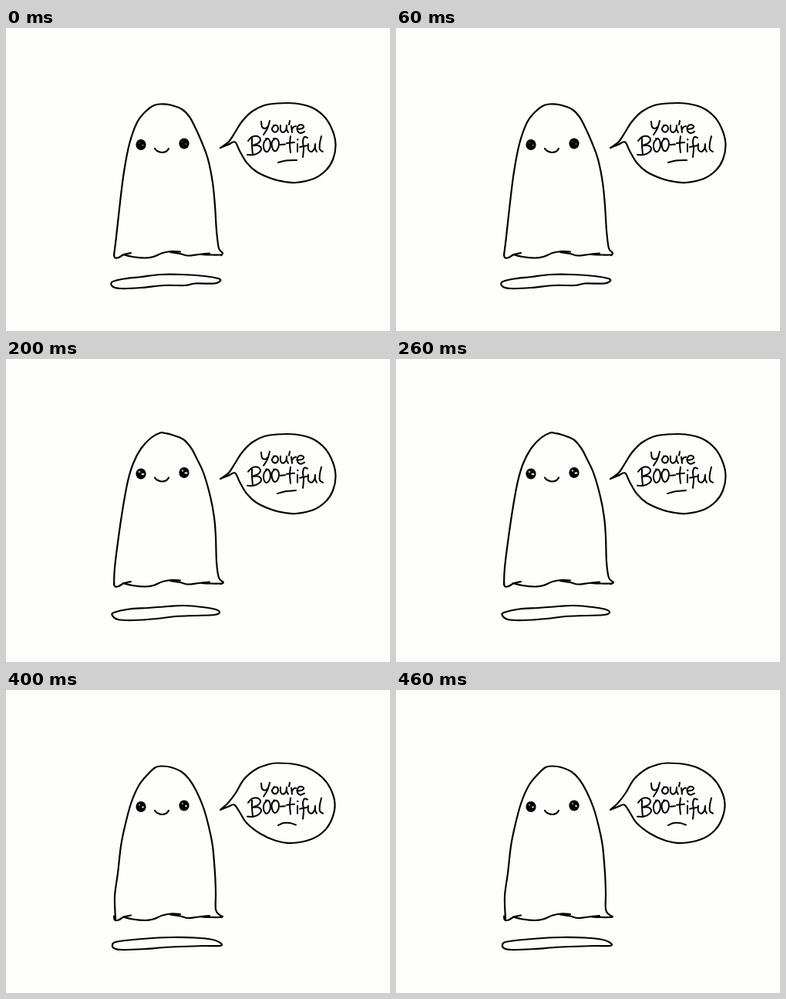
These frames come from a looping animation (498 by 392 pixels, 500 ms). An HTML page with a canvas:

```html
<!DOCTYPE html>
<html lang="en">
<head>
<meta charset="utf-8">
<title>Friendly ghost</title>
<style>
  html, body { margin: 0; width: 100%; height: 100%; overflow: hidden; background: #fdfefc; }
  canvas { display: block; }
</style>
</head>
<body>
<canvas id="stage" width="498" height="392" role="img" aria-label="A ghost says: You're BOO-tiful"></canvas>
<script>
const ctx = document.getElementById('stage').getContext('2d');
const PAPER = '#fdfefc', INK = '#000';

// Smooth curve through "x,y x,y ..." points (Catmull-Rom)
function curve(text, closed = false) {
  const p = text.split(' ').map(s => s.split(',').map(Number));
  const n = p.length;
  const at = i => closed ? p[(i + n) % n] : p[Math.max(0, Math.min(n - 1, i))];
  const path = new Path2D();
  path.moveTo(...p[0]);
  for (let i = 0; i < (closed ? n : n - 1); i++) {
    const [a, b, c, d] = [at(i - 1), at(i), at(i + 1), at(i + 2)];
    path.bezierCurveTo(
      b[0] + (c[0] - a[0]) / 6, b[1] + (c[1] - a[1]) / 6,
      c[0] - (d[0] - b[0]) / 6, c[1] - (d[1] - b[1]) / 6, c[0], c[1]);
  }
  return path;
}
const curves = list => list.map(s => curve(s));

const hem = curves([
  '140,292 141,297 146,297 153,293 162,291',
  '152,293 164,296 180,297.5 191,296 203,291 214,289 226,289.5',
  '213,290 226,292 236,294.5 250,293 264,291.5',
  '254,293 267,293.5 280,293.5'
]);
const smile = curve('193,156 196,159 202,161 208,159.5 211,156');

const lettering = curves([
  // You're
  '331,121 332,128 336,130 339,128', '342,120 339,130 334,138',
  '348,126 345,130 347,134 351,134 353,130 351,126 347,126',
  '356,126 356,132 359,135 363,132 364,126 364,131 366,135',
  '368,120 367,125', '370,127 371,135', '371,131 373,128 376,127',
  '378,131 384,130 386,127 382,125 378,128 378,133 382,136 387,134',
  // BOO-tiful
  '319,143 319,152 320,164',
  '314,146 319,141 326,140 330,144 327,149 320,152 327,152 331,156 328,161 321,164 313,164',
  '339,143 335,147 334,154 337,160 341,158 343,151 341,144 337,143',
  '349,143 345,147 345,154 348,159 352,157 354,150 352,144 347,143',
  '356,151 362,150.5', '369,140 368,150 369,161', '364,149 374,148',
  '378,150 378,160', '378,144 378.5,144.5',
  '391,142 387,141 385,147 386,156 385,167', '381,154 391,152',
  '392,150 392,157 396,160 400,156 401,150 401,156 403,160',
  '409,140 407,149 407,157 411,160'
]);

const bubbleWide = curve('278,155 289,147 297,135 306,121 319,108 335,100 352,97.5 375,97.5 397,103 414,116 424,134 427.5,152 424,170 415,184 399,195 376,200 362,199 345,195 325,186 312,174 303,159 297,147.5 288,151 278,155');
const bubbleRound = curve('278,155 288,146 298,133 309,115 325,102 341,96 352,94.5 374,96 392,101 410,113 421,128 426.5,147 423,166 413,182 396,193 370,198 350,195 330,186 312,172 303,158 296,148.5 288,151 278,155');

const poses = [
  {
    body: curve('140,294 143,270 148,225 153,186 160,150 170,122 180,109 190,101 199,98.5 213,99.5 228,105 238,115 246,130 254,148 262,170 268,200 271,230 273,262 276,285 281,291 279,294'),
    shadow: curve('137,329 150,325 175,322 200,319 230,319 258,321 275,324 278,327 270,330.5 245,330.5 232,333 205,333 175,336 150,337 139,335', true),
    bubble: bubbleWide, rule: curve('353,174 363,171.5 377,171'),
    hemY: 0, eyeY: 150.5, shine: 1, textY: 0
  },
  {
    body: curve('142,294 141,265 145,235 149,200 154,175 162,145 172,122 184,107 194,98 203,96.5 214,98 228,104 238,114 247,129 256,150 263,175 268,200 271,235 272,260 272,282 277,289 281,291'),
    shadow: curve('138,330 142,326 165,323 190,321 215,320 245,320.5 268,323 279,328 277,331 255,331 225,332 205,333 180,335 150,336 140,334', true),
    bubble: bubbleRound, rule: curve('353,175 360,172 368,172 376,174.5'),
    hemY: -1.5, eyeY: 148.5, shine: 1.6, textY: -.3
  },
  {
    body: curve('140,292 141,270 146,230 152,190 158,158 165,135 175,116 188,102 200,95.5 206,96 215,98 230,104 240,115 247,128 256,147 265,178 270,205 272,230 273,262 276,283 282,289 278,291'),
    shadow: curve('138,332 140,328 160,323.5 185,322 210,320 230,319 255,321 272,324 277,328 270,331 245,332 220,333 195,336 165,338 145,337', true),
    bubble: bubbleWide, rule: curve('352,174 364,171 376,170'),
    hemY: -3, eyeY: 148, shine: 2, textY: -.2
  }
];
const lifts = [0, 0, 0, -1, 2];

function dot(x, y, rx, ry, color) {
  ctx.fillStyle = color;
  ctx.beginPath();
  ctx.ellipse(x, y, rx, ry, 0, 0, 7);
  ctx.fill();
}

function eye(x, y, shine) {
  dot(x, y, 6.6, 7, INK);
  dot(x - 2, y - 2.5, shine * .6, shine * .6, '#bbb');
  dot(x + 2.5, y + .5, shine, shine * .6, '#ddd');
}

function shifted(dy, paint) {
  ctx.save();
  ctx.translate(0, dy);
  paint();
  ctx.restore();
}
const ink = path => ctx.stroke(path);

function draw(now) {
  const step = Math.floor(now / 100) % 5;
  const pose = poses[step % 3];
  ctx.fillStyle = PAPER;
  ctx.fillRect(0, 0, 498, 392);
  ctx.strokeStyle = INK;
  ctx.lineCap = ctx.lineJoin = 'round';
  ctx.lineWidth = 2.2;

  ink(pose.shadow);
  ink(pose.bubble);
  shifted(lifts[step], () => {
    ink(pose.body);
    shifted(pose.hemY, () => hem.forEach(ink));
    eye(175, pose.eyeY + .5, pose.shine);
    eye(231, pose.eyeY - 1, pose.shine);
    shifted(pose.eyeY - 150.5, () => ink(smile));
  });
  ctx.lineWidth = 2;
  ink(pose.rule);
  shifted(pose.textY, () => lettering.forEach(ink));
  requestAnimationFrame(draw);
}
draw(0);
</script>
</body>
</html>
```
